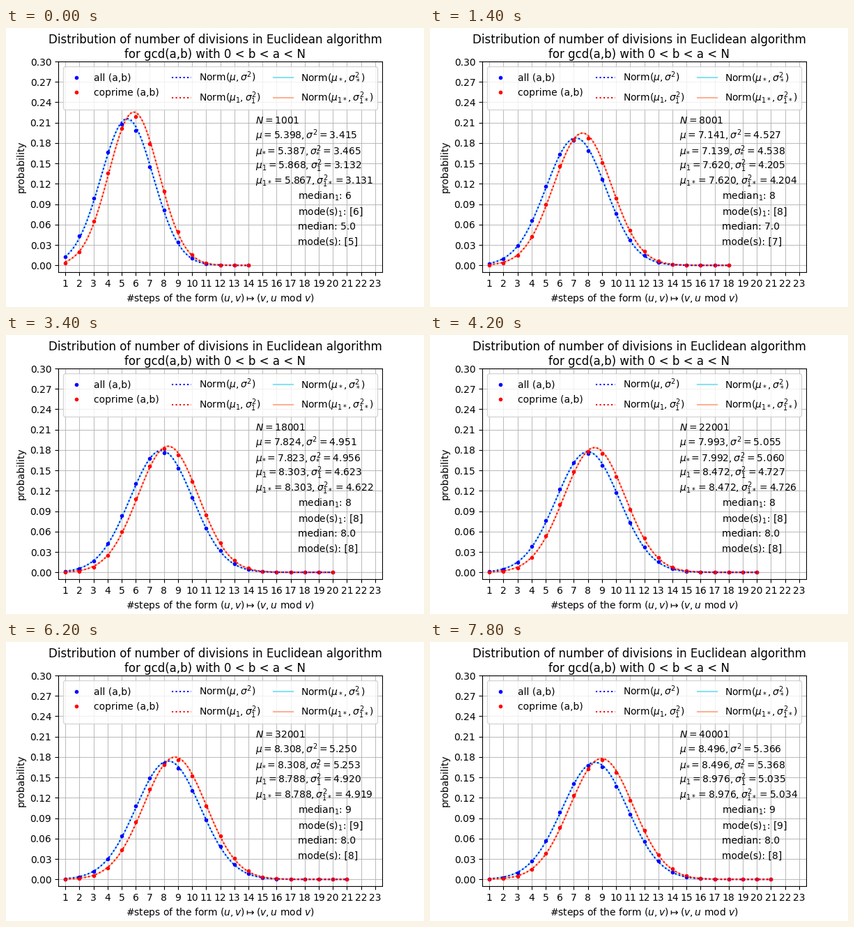
Recreate the animation shown at these times as a matplotlib script. Size 600 px wide and 400 px high, loop 8 s.

```python
import numpy as np
import matplotlib.pyplot as plt
from matplotlib.animation import FuncAnimation

FRAMES, INTERVAL = 40, 200
N = 1001 + 1000 * np.arange(FRAMES)
M = N - 1          # largest value of a
R = 500            # continuants are split where they first exceed R
KMAX = 32


def step_table(n):
    """T[a, b]: number of division steps for b < a <= n."""
    T = np.zeros((n + 1, n + 1), int)
    for a in range(2, n + 1):
        b = np.arange(1, a)
        T[a, 1:a] = 1 + T[b, a % b]
    return T


def histograms():
    """Step counts for every N: [:, 0] coprime pairs, [:, 1] the others."""
    T = step_table(R)
    hist = np.zeros((FRAMES, 2, KMAX))

    # pairs whose reduced form has a <= R, with all their multiples
    for a in range(2, R + 1):
        b = np.arange(1, a)
        count = np.bincount(T[a, 1:a][np.gcd(a, b) == 1], minlength=KMAX)
        hist[:, 0] += count
        hist[:, 1] += (M // a - 1)[:, None] * count

    # the rest: a = c*x + d*y with d <= R < c, c and d coprime, y < x
    x, y = np.tril_indices(M[-1] // R + 1, -1)
    right = T[x, y]
    nr = right.max() + 1
    group = right + nr * (np.gcd(x, y) > 1)
    group = group + 2 * nr * np.arange(FRAMES)[:, None]
    rows = 2 * nr * FRAMES
    for d in range(1, R + 1):
        res = np.arange(d)
        ok = np.gcd(res, d) == 1
        left = np.zeros((d, 18))
        left[res[ok], 1 + T[d, :d][ok]] = 1
        cum = left.cumsum(axis=0)

        low = np.where(y == 0, max(R, 2 * d - 1), R)
        top = (M[:, None] - d * y) // x
        keep = top > low
        g = group[keep]
        hi = top[keep]
        lo = np.broadcast_to(low, top.shape)[keep]
        qh, rh = np.divmod(hi, d)
        ql, rl = np.divmod(lo, d)
        part = (np.bincount(g * d + rh, minlength=rows * d)
                - np.bincount(g * d + rl, minlength=rows * d))
        full = np.bincount(g, qh - ql, minlength=rows)
        F = part.reshape(rows, d).astype(float) @ cum
        F += full[:, None] * cum[-1]
        F = F.reshape(FRAMES, 2, nr, 18)
        for r in range(nr):
            # an expansion of c/d may end in 1 or not
            hist[:, :, r:r + 18] += F[:, :, r]
            hist[:, :, r + 1:r + 19] += F[:, :, r]
    return hist


def stats(count):
    k = np.arange(KMAX)
    p = count / count.sum()
    mu = (k * p).sum()
    var = ((k - mu) ** 2 * p).sum()
    median = np.searchsorted(p.cumsum(), 0.5)
    return p, mu, var, median, p.argmax()


def norm(x, mu, var):
    return np.exp(-(x - mu) ** 2 / (2 * var)) / np.sqrt(2 * np.pi * var)


def limits(n):
    """Asymptotic mean and variance, all pairs then coprime pairs."""
    log = np.log(n - 1)
    mu = 12 * np.log(2) / np.pi ** 2 * log + 0.045695
    var = 0.5160624 * log - 0.43418
    return (mu - 0.480344, var + 0.334072), (mu, var)


hist = histograms()

fig, ax = plt.subplots(figsize=(6, 4), dpi=100)
fig.subplots_adjust(left=0.125, right=0.9, bottom=0.125, top=0.88)
fig.suptitle("Distribution of number of divisions in Euclidean algorithm\n"
             "for gcd(a,b) with 0 < b < a < N", fontsize=12)
ax.set_xlim(0.5, 23.5)
ax.set_ylim(-0.01, 0.3)
ax.set_xticks(range(1, 24))
ax.set_yticks(np.arange(11) * 0.03)
ax.set_xlabel(r"#steps of the form $(u,v)\mapsto(v,u\ \mathrm{mod}\ v)$")
ax.set_ylabel("probability")
ax.grid(True, alpha=0.8)

dots = [ax.plot([], [], "b.", label="all (a,b)")[0],
        ax.plot([], [], "r.", label="coprime (a,b)")[0]]
fits = [ax.plot([], [], "b:", label=r"Norm$(\mu,\sigma^2)$")[0],
        ax.plot([], [], "r:", label=r"Norm$(\mu_1,\sigma_1^2)$")[0]]
bells = [ax.plot([], [], color="#86e2f0", zorder=1.8,
                 label=r"Norm$(\mu_*,\sigma_*^2)$")[0],
         ax.plot([], [], color="#ffb193", zorder=1.8,
                 label=r"Norm$(\mu_{1*},\sigma_{1*}^2)$")[0]]
ax.legend(loc="upper center", ncol=3, mode="expand")
notes = [ax.text(14.5 if i < 5 else 17.5, 0.2085 - 0.0223 * i, "")
         for i in range(9)]


def moments(sub, mu, var):
    low = "_{%s}" % sub if sub else ""
    return r"$\mu%s=%.3f,\sigma%s^2=%.3f$" % (low, mu, low, var)


def draw(i):
    coprime = hist[i, 0]
    data = [stats(hist[i].sum(axis=0)), stats(coprime)]
    theory = limits(N[i])
    last = np.flatnonzero(coprime)[-1]
    k = np.arange(1, last + 1)
    x = np.linspace(1, last, 300)
    for j in range(2):
        p, mu, var = data[j][:3]
        dots[j].set_data(k, p[1:last + 1])
        fits[j].set_data(x, norm(x, mu, var))
        bells[j].set_data(x, norm(x, *theory[j]))
    (_, mu, var, med, mode), (_, mu1, var1, med1, mode1) = data
    lines = ["$N=%d$" % N[i],
             moments("", mu, var),
             moments("*", *theory[0]),
             moments("1", mu1, var1),
             moments("1*", *theory[1]),
             "median$_1$: %d" % med1,
             "mode(s)$_1$: [%d]" % mode1,
             "median: %.1f" % med,
             "mode(s): [%d]" % mode]
    for note, line in zip(notes, lines):
        note.set_text(line)
    return dots + fits + bells + notes


anim = FuncAnimation(fig, draw, frames=FRAMES, init_func=lambda: draw(0),
                     interval=INTERVAL, repeat=True, repeat_delay=0)
plt.show()
```
